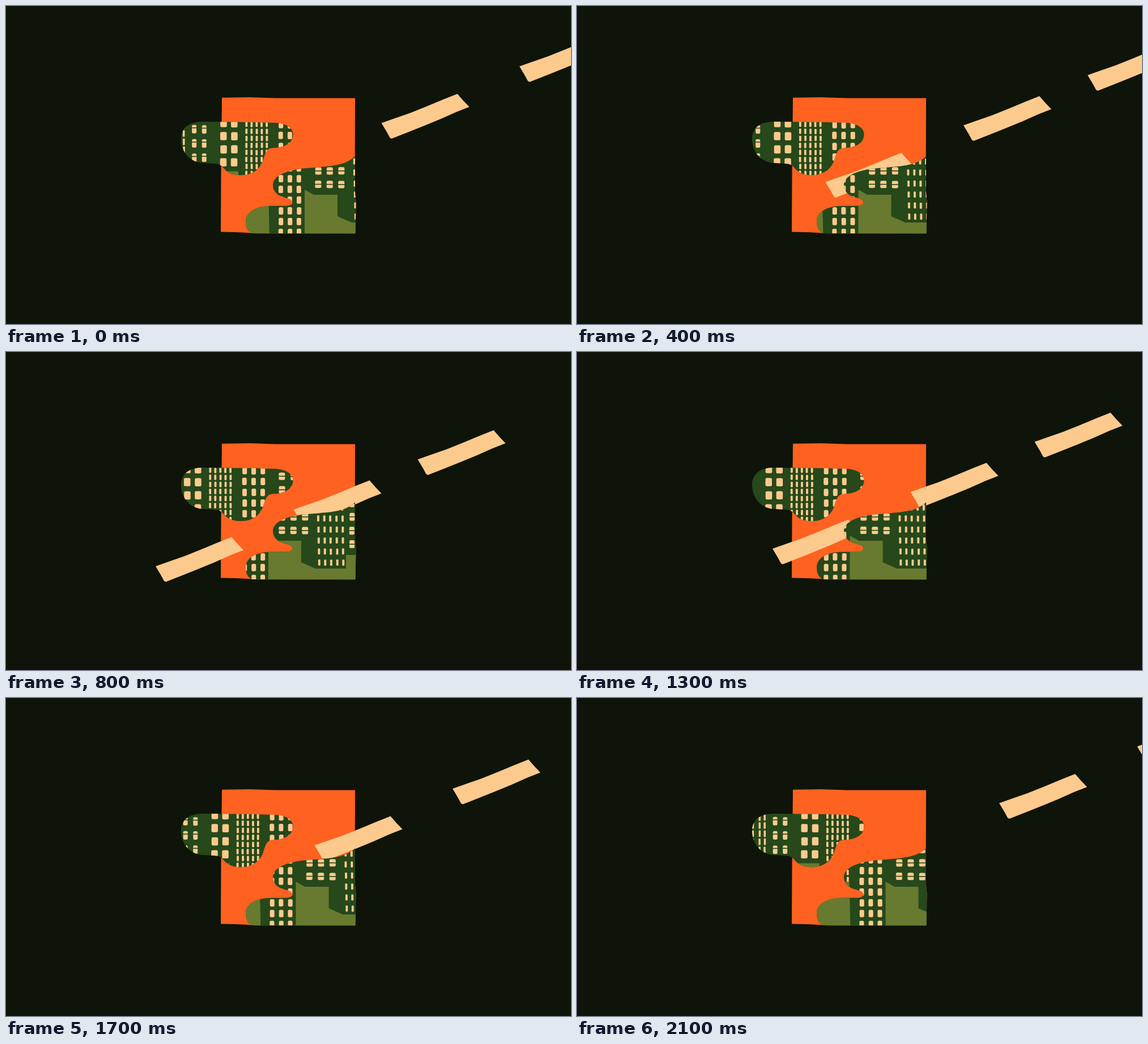
Write an HTML page with a canvas that moves like this. It is 997 px wide and 561 px high and loops after 2300 ms.

```html
<!DOCTYPE html>
<html lang="en">
<head>
<meta charset="utf-8">
<title>City map</title>
<style>
html, body { margin: 0; width: 100%; height: 100%; overflow: hidden; background: #0e1409; }
canvas { display: block; }
</style>
</head>
<body>
<canvas id="stage" width="997" height="561"></canvas>
<script>
const ctx = document.getElementById('stage').getContext('2d');
const NIGHT = '#0e1409', ORANGE = '#ff6120', CREAM = '#fdca8e', GREEN = '#26481a', OLIVE = '#687a2f';

const LOOP = 2300, STEP = 200, PAUSE_START = 800, PAUSE_END = 1300;

// Each pose: horizontal shift of the city, position of the first road dash.
const POSES = [
  { city: 17.5, road: [745, 185.5] },
  { city: 0, road: [662.5, 206.5] },
  { city: -15.5, road: [544.5, 260] },
  { city: -30.5, road: [438.5, 310.5] },
  { city: -45.5, road: [345, 347] },
  { city: -64, road: [264, 378] }
];
const DASH_OFFSETS = [[0, 0], [243.5, -100], [462.5, -188.5]];

const dash = new Path2D(`M0 0 L24 -8.5 L50 -17.5 L80 -29.5 L110 -42 L134 -51.5
  L144 -40 L155 -28.5 L132 -19.5 L104 -7 L76 4.5 L46 16.5 L18 27.5 L15 26 L9 15 Z`);
const square = new Path2D(`M381 161.7 L430 161 L475 162.6 L616 162.6 L615.7 265 L616 330 L617.5 345
  L616.5 401.3 L440 401.3 L425 400 L405 399 L379 398.5 L379.5 300 Z`);
const upperCloud = new Path2D(`M309 234 C309 216 322 204 347 204 L440 205 L472 206
  C492 206 506.5 214 506.5 226 C506.5 242 492 250 470 250.5 C460 251 458 260 455 268
  C451 285 438 298.5 413 298.5 C398 298 390 293 384 286 C380 281 376 278 366 278
  L350 277 C325 277 309 258 309 234 Z`);
const lowerCloud = new Path2D(`M616 265 C602 279 580 282 555 284 C535 286 520 286 505 290
  C484 295 471 304 471 316 C471 329 482 336 494 338.5 C501 340 505.5 343 505.5 347
  C505 351 499 352.5 493 352.5 L470 352.5 C440 352.5 423 364 423 380 C423 391 427 398 434 401
  L616.5 401.3 L617.5 345 L616 330 Z`);
const ground = new Path2D(`M200 291.5 H410 V324 H463 L465 410 H527 V324 L543 333 H585 V371
  L610 382 H664 V358 H760 V430 H200 Z`);

// Rows of windows on one facade; split is the relative height of a crossbar,
// lean the sideways drift per pixel down.
const FACADES = [
  { xs: [291, 303, 312], w: 3.5, y: 205, rows: 5, pitch: 14.3, h: 11.5 },
  { xs: [328, 345.5], w: 8, y: 210, rows: 3, pitch: 25, h: 15, split: 0.35 },
  { xs: [378, 397], w: 11.5, y: 199.5, rows: 4, pitch: 23, h: 14.5 },
  { xs: [422.3, 431.4, 440.4, 449.4, 458.3], w: 3.8, y: 204, rows: 10, pitch: 12.4, h: 9.5 },
  { xs: [481, 497, 513], w: 8, y: 203, rows: 11, pitch: 19, h: 13 },
  { xs: [545.5, 566, 586], w: 11, y: 213, rows: 5, pitch: 23.8, h: 13, split: 0.5 },
  { xs: [612.8, 623.4, 634, 644.8, 655.5], w: 3.9, y: 269, rows: 6, pitch: 19.4, h: 10.8, lean: 0.018 },
  { xs: [670], w: 9, y: 260, rows: 4, pitch: 24, h: 14, split: 0.5 }
];

function wobble(n) {
  const v = Math.sin(n * 12.9898) * 43758.5453;
  return v - Math.floor(v) - 0.5;
}

function fill(path, color) {
  ctx.fillStyle = color;
  ctx.fill(path);
}

function drawFacade({ xs, w, y, rows, pitch, h, split, lean = 0 }) {
  xs.forEach((x, col) => {
    for (let row = 0; row < rows; row++) {
      const left = x + row * pitch * lean + wobble(x + row) * 0.6;
      const top = y + row * pitch + wobble(col + row * 7) * 0.6;
      ctx.fillStyle = CREAM;
      ctx.beginPath();
      ctx.roundRect(left, top, w, h, Math.min(2.5, w * 0.35));
      ctx.fill();
      if (split) {
        ctx.fillStyle = GREEN;
        ctx.fillRect(left - 1, top + h * split - 0.8, w + 2, 1.6);
      }
    }
  });
}

function drawCity(cloud, shift) {
  ctx.save();
  ctx.clip(cloud);
  ctx.fillStyle = GREEN;
  ctx.fillRect(300, 190, 330, 220);
  ctx.translate(shift, 0);
  FACADES.forEach(drawFacade);
  fill(ground, OLIVE);
  ctx.restore();
}

function drawRoad([x, y]) {
  for (const [dx, dy] of DASH_OFFSETS) {
    ctx.save();
    ctx.translate(x + dx, y + dy);
    fill(dash, CREAM);
    ctx.restore();
  }
}

// Forward to the last pose, a pause there, then all the way back.
function poseAt(time) {
  if (time < PAUSE_START) return POSES[1 + Math.floor(time / STEP)];
  if (time < PAUSE_END) return POSES[5];
  return POSES[4 - Math.floor((time - PAUSE_END) / STEP)];
}

const start = performance.now();

function render() {
  const pose = poseAt((performance.now() - start) % LOOP);
  ctx.fillStyle = NIGHT;
  ctx.fillRect(0, 0, 997, 561);
  fill(square, ORANGE);
  drawRoad(pose.road);
  drawCity(upperCloud, pose.city);
  drawCity(lowerCloud, pose.city);
  requestAnimationFrame(render);
}
render();
</script>
</body>
</html>
```
